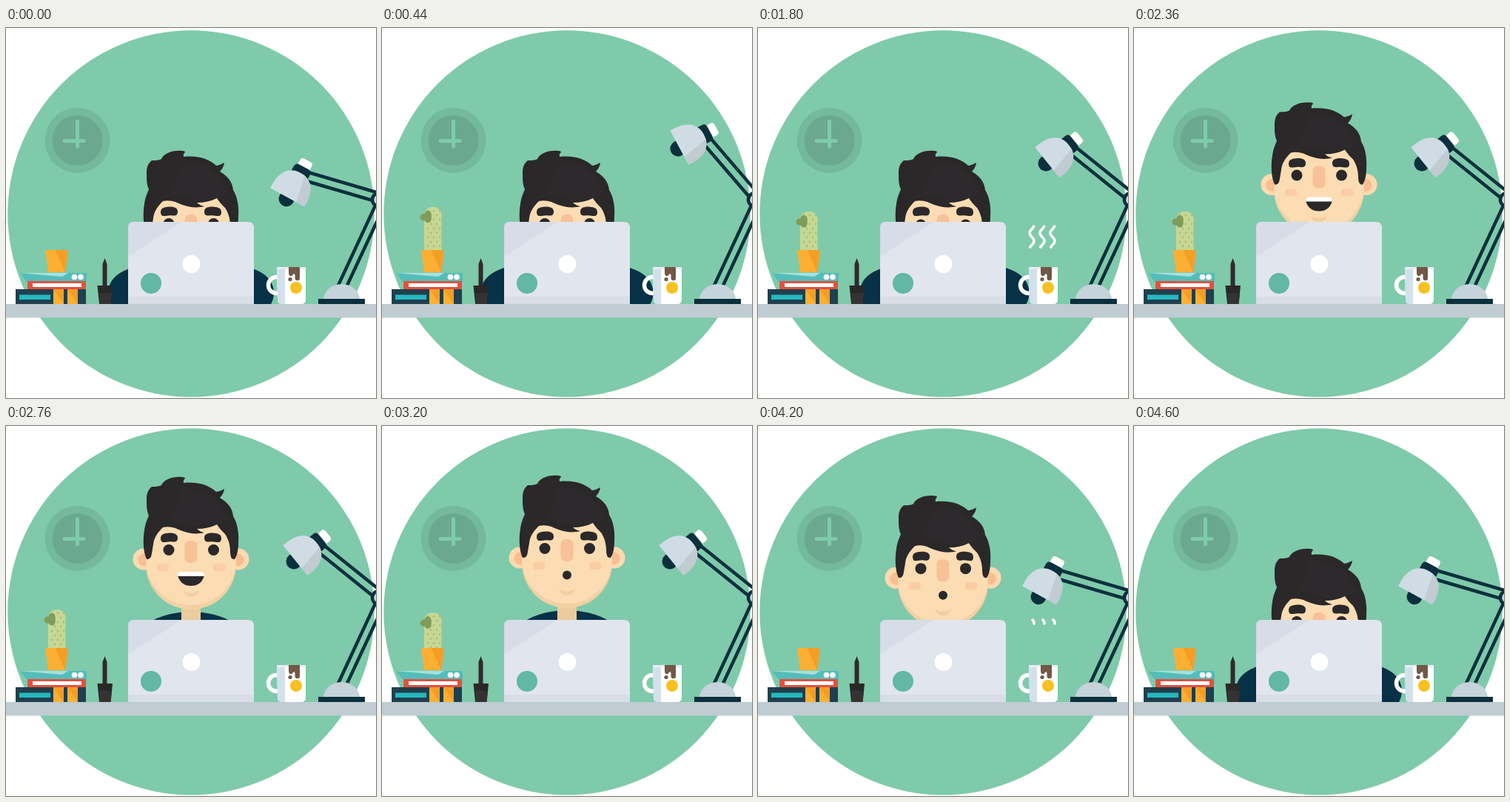
Recreate the animation shown at these times as an HTML page. Size 500 px wide and 500 px high, loop 4.64 s.

```html
<!DOCTYPE html>
<html lang="en">
<head>
<meta charset="utf-8">
<title>At the desk</title>
<style>
html, body { margin: 0; width: 100%; height: 100%; overflow: hidden; background: #fff; }
svg { display: block; width: 100vw; height: 100vh; }
</style>
</head>
<body>
<svg viewBox="0 0 500 500">
  <defs>
    <clipPath id="aboveDesk"><rect width="500" height="373"/></clipPath>
    <clipPath id="abovePot"><rect width="500" height="302"/></clipPath>
    <clipPath id="shade"><path d="M-26 0C-28 -24 -18 -38 0 -38C18 -38 28 -24 26 0Z"/></clipPath>
    <radialGradient id="glow" gradientUnits="userSpaceOnUse" cx="392" cy="178" r="155">
      <stop offset="0" stop-color="#fff" stop-opacity=".58"/>
      <stop offset=".4" stop-color="#fff" stop-opacity=".24"/>
      <stop offset=".75" stop-color="#fff" stop-opacity=".07"/>
      <stop offset="1" stop-color="#fff" stop-opacity="0"/>
    </radialGradient>
  </defs>

  <circle cx="250" cy="251" r="247.7" fill="#7fcaab"/>

  <g id="clock">
    <circle cx="96.500" cy="152" r="44" fill="#75b99d"/>
    <circle cx="96.500" cy="152" r="34" fill="#6aa98f"/>
    <path d="M96.500 126V160M79 152.500H105" stroke="#7fcaab" stroke-width="5" stroke-linecap="round"/>
  </g>

  <g clip-path="url(#aboveDesk)">
    <g fill="#063146">
      <path id="elbowL" d="M215 322H176C158 327 147 334 142 343C136 354 137 365 143 375H215Z"/>
      <path id="elbowR" d="M285 322H324C342 327 353 334 358 343C364 354 363 365 357 375H285Z"/>
    </g>
    <g id="man">
      <ellipse cx="250" cy="300" rx="80" ry="49" fill="#063146"/>
      <rect x="237" y="236" width="26" height="32" fill="#eccb9f"/>
      <circle cx="186" cy="180" r="14.500" fill="#fcdab0"/>
      <circle cx="314" cy="180" r="14.500" fill="#fcdab0"/>
      <circle cx="187" cy="181" r="8.500" fill="#f8bd90"/>
      <circle cx="313" cy="181" r="8.500" fill="#f8bd90"/>
      <path d="M189 130H311V187A61 61 0 0 1 189 187Z" fill="#f2d0a3"/>
      <path d="M189 130H311V182A61 60 0 0 1 189 182Z" fill="#fcdcb3"/>
      <rect x="204" y="186" width="16" height="10" rx="4" fill="#facda4"/>
      <rect x="280" y="186" width="16" height="10" rx="4" fill="#facda4"/>
      <rect x="241.500" y="155" width="17" height="30" rx="7" fill="#f8c199"/>
      <path d="M239 222Q250 229 261 222Q259 231 250 231Q241 231 239 222Z" fill="#f2cfa2"/>
      <g fill="#2a2829">
        <g id="eyes"><circle cx="220" cy="167.500" r="7.500"/><circle cx="280.500" cy="167.500" r="7.500"/></g>
        <path d="M209 152C209 146 214 145 221 144.500C229 144.500 232 147 232 151C232 156 229 157 225 156.500C220 155.500 217 157 213 157Q209 157 209 152Z"/>
        <path d="M291 152C291 146 286 145 279 144.500C271 144.500 268 147 268 151C268 156 271 157 275 156.500C280 155.500 283 157 287 157Q291 157 291 152Z"/>
        <path d="M190 180C185 170 185 151 187 141C188 132 191 126 193 121C190 114 190 108 190 99C190 91 192 86 197 82C201 82 206 82 210 80C213 73 224 68 238 69Q242 69 242 71Q239 73 240 77C262 75 275 81 284 89Q290 88 295 85Q294 92 289 97C299 103 306 110 307 122C313 131 315 146 314 158C314 168 312 176 309 180Q303 181 303 170C303 160 300 152 296 146C292 142 288 138 285 133C277 137 268 139 258 139Q262 143 268 144C252 148 240 143 229 138Q220 135 212 137C206 143 200 150 199 160L197 172Q196 181 190 180Z"/>
      </g>
      <path d="M237 86Q273 82 288 107Q300 118 302 128Q260 142 224 125Z" fill="#312f30" opacity=".4"/>
      <g id="smile">
        <path d="M232 202H268Q264 216 250 216Q236 216 232 202Z" fill="#2a2829"/>
        <path d="M232 203Q232 197 237 197H263Q268 197 268 203Z" fill="#fff"/>
      </g>
      <circle id="oh" cx="250" cy="203.500" r="6" fill="#2a2829"/>
    </g>
  </g>

  <path id="beam" d="M377 161L230 172V310L365 325L405 197Z" fill="url(#glow)"/>

  <g id="laptop">
    <path d="M165 373V270Q165 262 173 262H327Q335 262 335 270V373Z" fill="#e1e5ee"/>
    <path d="M165 309V270Q165 262 173 262H237Z" fill="#d6dde6"/>
    <rect x="165" y="363" width="170" height="10" fill="#d8dde6"/>
    <circle cx="250.500" cy="319" r="12" fill="#fff"/>
    <circle cx="196" cy="345" r="14" fill="#62b7a5"/>
  </g>

  <g clip-path="url(#abovePot)">
    <g id="cactus">
      <rect x="57" y="248" width="23.500" height="70" rx="11" fill="#c6d794"/>
      <g id="spots" fill="#a9bf78"></g>
      <g stroke="#809c59" stroke-linecap="round">
        <path d="M56 262H62" stroke-width="9"/>
        <path d="M62 257.500V265" stroke-width="9"/>
      </g>
    </g>
  </g>
  <path d="M53 300H84L80 330H57Z" fill="#fbb034"/>
  <path d="M66 300H84L80 330Z" fill="#f59e27"/>

  <g id="books">
    <path d="M19 331H109V342H27Z" fill="#54bdb9"/>
    <path d="M19 331H84L76 336Z" fill="#a9e0dc"/>
    <circle cx="92.500" cy="336.500" r="3.800" fill="#fff"/>
    <circle cx="101" cy="336.500" r="3.800" fill="#fff"/>
    <rect x="29" y="342" width="79" height="11" fill="#e0523f"/>
    <rect x="36" y="345" width="66" height="5" fill="#fff"/>
    <rect x="13" y="353" width="95" height="20" fill="#213f4d"/>
    <rect x="18" y="360.500" width="42" height="6.500" fill="#25b8bd"/>
    <path d="M64 353H78V373H64ZM83 353H97V373H83Z" fill="#fbb034"/>
    <path d="M64 353H78V373ZM83 353H97V373Z" fill="#f59e27"/>
  </g>

  <path d="M130.500 349V319L133.500 311L136.500 319V349Z" fill="#2f2b2c"/>
  <path d="M123.500 348H144L141.500 373H126Z" fill="#2a2829"/>
  <path d="M126 358H143L141.500 373H126.500Z" fill="#353233"/>

  <g id="steam" fill="none" stroke="#fff" stroke-width="3.600" stroke-linecap="round"></g>
  <g id="mug">
    <circle cx="365.500" cy="347.500" r="11" fill="none" stroke="#fff" stroke-width="5.500"/>
    <path d="M366 323H405V367Q405 373 399 373H373Q367 373 367 367Z" fill="#fff"/>
    <path d="M366 323H377V373H373Q367 373 367 367Z" fill="#d3e0ea"/>
    <path d="M366 323H405V326H366Z" fill="#e6eef3"/>
    <path d="M382 323H397V338A3.200 3.200 0 0 1 390.500 338V334Q390 331 388 333Q386 336 384 335Q382 334 382 331Z" fill="#705946"/>
    <circle cx="384" cy="339.500" r="2.600" fill="#705946"/>
    <circle cx="392" cy="351" r="8" fill="#f6c021"/>
  </g>

  <g stroke="#0b303d" stroke-width="4.500">
    <path d="M447 352L500 238M459 352L502 260"/>
    <g id="lamp">
      <path d="M398 192L504 223M398 204.500L504 235.500"/>
      <g id="lampHead" stroke="none" transform="translate(380 229) rotate(28.600)">
        <rect x="-9" y="-57" width="18" height="16" rx="4" fill="#fff"/>
        <rect x="-12.500" y="-47" width="25" height="16" rx="5" fill="#0b303d"/>
        <circle id="bulb" cy="2" r="10.500" fill="#0b303d"/>
        <g clip-path="url(#shade)">
          <rect x="-30" y="-40" width="60" height="40" fill="#cfdce4"/>
          <path d="M6 -40H30V0H14Z" fill="#c1cbd2"/>
        </g>
      </g>
    </g>
    <circle cx="504" cy="232" r="9" fill="#c9d8de"/>
  </g>
  <path d="M429 367A24.500 21 0 0 1 478 367Z" fill="#c5d3da"/>
  <rect x="422" y="366" width="63" height="7" fill="#0b303d"/>

  <rect y="373" width="500" height="18.500" fill="#bfccd1"/>
</svg>
<script>
const LOOP = 4640, STEP = 40;
const $ = id => document.getElementById(id);
const NS = "http://www.w3.org/2000/svg";

function add(parent, tag, attrs) {
  const el = document.createElementNS(NS, tag);
  for (const k in attrs) el.setAttribute(k, attrs[k]);
  parent.appendChild(el);
  return el;
}

for (let row = 0; row < 9; row++)
  for (let x = 62 + (row % 2) * 4; x < 79; x += 8)
    add($("spots"), "circle", { cx: x, cy: 253 + row * 6, r: 1.4 });

const wisps = [370, 384, 398].map(x => ({ x, el: add($("steam"), "path", {}) }));

// Eased value between [time, value] keys.
function ease(t, keys) {
  if (t <= keys[0][0]) return keys[0][1];
  for (let i = 1; i < keys.length; i++) {
    const [t1, v1] = keys[i], [t0, v0] = keys[i - 1];
    if (t < t1) {
      const p = (t - t0) / (t1 - t0);
      return v0 + (v1 - v0) * p * p * (3 - 2 * p);
    }
  }
  return keys[keys.length - 1][1];
}

const HEAD = [[2120, 97], [2520, -4], [2720, 0], [2880, 0], [3080, -10], [3320, 6],
  [3960, 6], [4080, -9], [4400, 99], [4520, 96.5], [4600, 97]];
const LAMP = [[80, 0], [440, 33], [640, 19], [840, 24], [1000, 22.5],
  [3280, 22.5], [3440, 33], [3680, -1], [3800, 0.4], [3920, 0]];
const CACTUS = [[80, 60], [420, -6.5], [600, 2], [740, 0], [3000, 0], [3120, -6], [3440, 60]];
const LIGHT = [[880, 0], [960, 1], [1400, 1], [1520, 0]];
const LOOK = [[1500, 0], [1700, 1.5], [2000, 1.5], [2160, 0]];
const LEFT = [[40, 0], [360, 4.5], [1480, 4.5], [1720, 0.5]];
const RIGHT = [[40, 0], [360, 4.5], [2120, 4.5], [2240, 0]];
const OH = [[2960, 0], [3080, 1]];
const PUFFS = [1440, 3600];

const shift = (id, x, y) => $(id).setAttribute("transform", `translate(${x} ${y})`);

function drawSteam(t) {
  const start = PUFFS.find(s => t > s && t < s + 660);
  const age = t - start;
  const top = Math.max(262, 312 - age * 0.122);
  const bottom = Math.min(311, 312 - (age - 235) * 0.122);
  const on = start !== undefined && bottom > top;
  for (const { x, el } of wisps) {
    let d = "";
    for (let y = top; on && y <= bottom; y += 1)
      d += `${d ? "L" : "M"}${(x - 3 * Math.cos((y - 277) * 0.292)).toFixed(2)} ${y.toFixed(2)}`;
    el.setAttribute("d", d);
  }
}

function draw(t) {
  const head = ease(t, HEAD), light = ease(t, LIGHT), oh = ease(t, OH);
  const tuck = Math.max(0, 1 - head / 97) * 42;
  shift("man", 0, head);
  shift("eyes", 0, ease(t, LOOK));
  shift("elbowL", tuck - ease(t, LEFT), 0);
  shift("elbowR", ease(t, RIGHT) - tuck, 0);
  shift("cactus", 0, ease(t, CACTUS));
  $("lamp").setAttribute("transform", `rotate(${ease(t, LAMP)} 504 232)`);
  $("beam").setAttribute("opacity", light);
  $("bulb").setAttribute("fill", light > 0.5 ? "#8fa3a8" : "#0b303d");
  $("smile").setAttribute("visibility", oh > 0 ? "hidden" : "visible");
  $("oh").setAttribute("r", 6 * oh);
  drawSteam(t);
}

const begin = performance.now();
function tick() {
  const t = (performance.now() - begin) % LOOP;
  draw(Math.floor(t / STEP) * STEP);
  requestAnimationFrame(tick);
}
tick();
</script>
</body>
</html>
```
